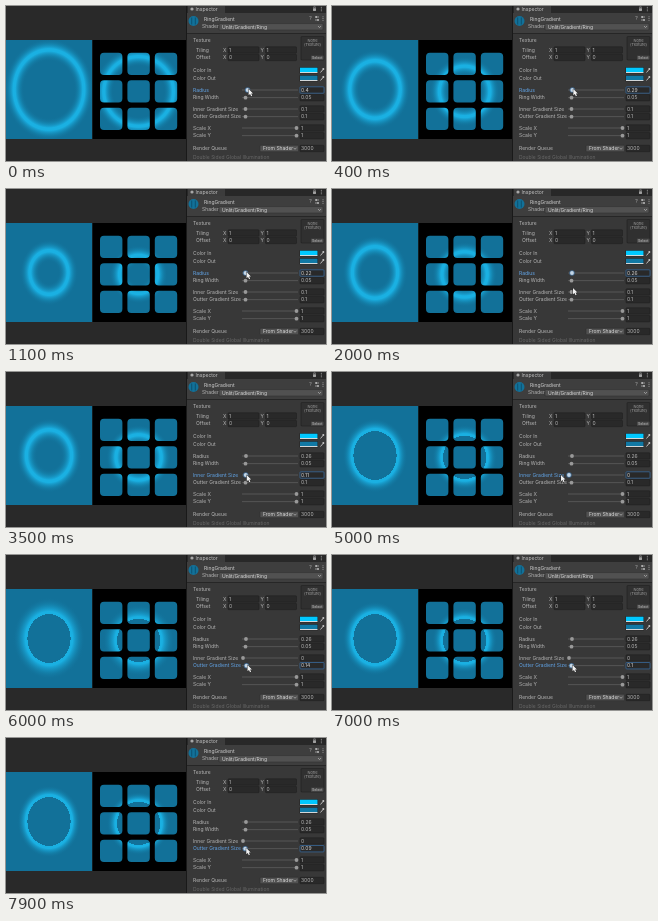
Animation of 320 by 155 pixels, one loop 8000 ms. Source, as an HTML page with a canvas:

```html
<!DOCTYPE html>
<html lang="en">
<head>
<meta charset="utf-8">
<title>Ring gradient inspector</title>
<style>
html, body { margin: 0; width: 100%; height: 100%; overflow: hidden; background: #383838; }
canvas { display: block; width: 100vw; height: 100vh; }
</style>
</head>
<body>
<canvas id="stage"></canvas>
<script>
const W = 320, H = 155, LOOP = 8000, STEP = 100;
const canvas = document.getElementById('stage');
const ctx = canvas.getContext('2d');
const FONT = 'Inter, Roboto, sans-serif';
const COLOR_IN = [26, 176, 226], COLOR_OUT = [18, 113, 153];
const PANEL = '#383838', BACKDROP = '#292929', FIELD = '#292929', TEXT = '#b8b8b8', ACTIVE = '#62a6ea';

// Keys are [time in ms, value], joined by straight lines.
const RADIUS = [[200, .4], [300, .34], [400, .29], [600, .27], [700, .27], [1100, .22], [1500, .27], [1700, .27], [1800, .26]];
const INNER = [[2500, .1], [3000, .15], [3400, .15], [3500, .11], [4000, .05], [4100, .05], [4600, 0]];
const OUTER = [[5500, .1], [6000, .14], [6400, .17], [6700, .16], [7200, .06], [7600, .1], [7700, .1], [7900, .09]];
const POINTER_Y = [[1800, 83], [2000, 99], [2400, 103], [5100, 103], [5400, 110]];
const POINTER_DX = [[4500, 1], [5000, -8], [5100, -8], [5400, 4], [5500, 1]];

function at(keys, t) {
  if (t <= keys[0][0]) return keys[0][1];
  for (let i = 1; i < keys.length; i++) {
    const [t0, a] = keys[i - 1], [t1, b] = keys[i];
    if (t <= t1) return a + (b - a) * (t - t0) / (t1 - t0);
  }
  return keys[keys.length - 1][1];
}

function rect(x, y, w, h, fill) {
  ctx.fillStyle = fill;
  ctx.fillRect(x, y, w, h);
}

function box(x, y, w, h, r, fill, stroke) {
  ctx.beginPath();
  ctx.roundRect(x, y, w, h, r);
  ctx.fillStyle = fill;
  ctx.fill();
  if (stroke) {
    ctx.strokeStyle = stroke;
    ctx.lineWidth = .6;
    ctx.stroke();
  }
}

function disc(x, y, r, fill) {
  ctx.beginPath();
  ctx.arc(x, y, r, 0, Math.PI * 2);
  ctx.fillStyle = fill;
  ctx.fill();
}

function line(points, color, width = .7) {
  ctx.beginPath();
  points.forEach(([x, y]) => ctx.lineTo(x, y));
  ctx.strokeStyle = color;
  ctx.lineWidth = width;
  ctx.stroke();
}

function dots(x, y) {
  for (let i = 0; i < 3; i++) disc(x, y + i * 1.8, .5, '#b0b0b0');
}

function label(str, x, y, color = TEXT, size = 5, align = 'left') {
  ctx.font = `${size}px ${FONT}`;
  ctx.textAlign = align;
  ctx.textBaseline = 'middle';
  ctx.fillStyle = color;
  ctx.fillText(str, x, y);
}

function field(str, x, y, w, active) {
  box(x, y - 3.2, w, 6.4, .8, FIELD, active ? '#3a79bb' : '#202020');
  label(str, x + 1, y + .2, active ? '#d4d4d4' : TEXT);
}

function mix(k) {
  return `rgb(${COLOR_OUT.map((c, i) => Math.round(c + (COLOR_IN[i] - c) * k))})`;
}

// Narrow crest with a quadratic falloff on either side.
function ringGradient(radius, width, inner, outer) {
  const g = ctx.createRadialGradient(0, 0, 0, 0, 0, 1);
  const near = radius - width / 4, far = radius + width / 4, n = 8;
  for (let i = 0; i <= n; i++) {
    const u = i / n;
    g.addColorStop(Math.max(0, near - inner * (1 - u)), mix(u * u));
  }
  for (let i = 0; i <= n; i++) {
    const u = i / n;
    g.addColorStop(far + outer * u, mix((1 - u) ** 2));
  }
  return g;
}

// Fills the current path with the ring laid over the given area.
function paintRing(cx, cy, w, h, ring) {
  ctx.save();
  ctx.clip();
  ctx.translate(cx, cy);
  ctx.scale(w, h);
  ctx.fillStyle = ring;
  ctx.fillRect(-.5, -.5, 1, 1);
  ctx.restore();
}

function drawScene(ring) {
  rect(0, 0, 181, H, BACKDROP);
  ctx.beginPath();
  ctx.rect(0, 34, 86.5, 99);
  paintRing(43, 83.5, 87, 99, ring);
  rect(86.5, 34, 93.5, 99, '#000');
  ctx.beginPath();
  for (let i = 0; i < 9; i++) {
    ctx.roundRect(94 + i % 3 * 27.4, 46.7 + Math.floor(i / 3) * 27.5, 22.4, 22.4, 4);
  }
  paintRing(132.6, 85.4, 87, 87, ring);
}

function dropdown(str, x, y, w) {
  box(x, y - 3.2, w, 6.4, .8, '#515151', '#303030');
  label(str, x + 3, y + .2, '#d8d8d8');
  line([[x + w - 5, y - .8], [x + w - 3.5, y + .8], [x + w - 2, y - .8]], TEXT);
}

function drawHeader() {
  rect(180, 0, 140, H, PANEL);
  rect(180, 0, 1, H, '#191919');
  rect(181, 0, 139, 7, '#282828');
  rect(182, 0, 37, 7, '#3c3c3c');
  disc(186, 3, 1.6, '#a8a8a8');
  label('Inspector', 189.5, 3.2, '#c8c8c8');
  box(307, 2.3, 3, 2.6, .4, '#a0a0a0');
  line([[307.7, 2.5], [307.7, .8], [309.3, .8], [309.3, 2.5]], '#a0a0a0', .6);
  dots(315.3, 1.2);

  rect(181, 7, 139, 20, '#3e3e3e');
  rect(181, 27, 139, .8, '#222');
  disc(187.5, 15, 5, mix(0));
  rect(185.2, 11.5, 1, 7, '#0d5170');
  rect(188.8, 11.5, 1, 7, '#0d5170');
  label('RingGradient', 198, 13.3, '#d0d0d0');
  label('?', 304.5, 12.5, TEXT, 5, 'center');
  line([[309, 11], [313, 11]], TEXT);
  line([[309, 14], [313, 14]], TEXT);
  disc(310.2, 11, .9, TEXT);
  disc(312, 14, .9, TEXT);
  dots(317, 10.7);
  label('Shader', 196, 20.8);
  dropdown('Unlit/Gradient/Ring', 213, 20.8, 104);
}

function swatch(name, y, color) {
  label(name, 187, y);
  rect(293.5, y - 3.2, 18.5, 6, '#202020');
  rect(294, y - 2.8, 17.5, 4.5, color);
  rect(294, y + 1.7, 17.5, .8, '#fff');
  line([[314.5, y + 2], [317, y - 1]], '#c8c8c8', .9);
  disc(317.3, y - 1.5, 1, '#c8c8c8');
}

function drawTexture() {
  label('Texture', 187, 34);
  [['Tiling', 1, 44], ['Offset', 0, 51.5]].forEach(([name, v, y]) => {
    label(name, 190, y);
    label('X', 217, y);
    field(v, 222, y, 31);
    label('Y', 254.5, y);
    field(v, 259.5, y, 31);
  });
  box(295, 30.5, 23, 23.5, .8, '#303030', '#202020');
  label('None', 306.5, 34.3, '#a0a0a0', 4, 'center');
  label('(Texture)', 306.5, 38.6, '#a0a0a0', 4, 'center');
  rect(305, 49.7, 12.5, 4, '#4a4a4a');
  label('Select', 311.2, 51.8, '#c0c0c0', 3.6, 'center');
}

function slider(name, value, y, knob, active) {
  label(name, 187, y, active ? ACTIVE : TEXT);
  rect(236, y - .4, 56, .8, '#5c5c5c');
  if (active) disc(knob, y, 2.7, 'rgba(70,130,190,.65)');
  disc(knob, y, 1.9, active ? '#c4d6e6' : '#999');
  field(String(+value.toFixed(2)), 294, y, 24, active);
}

function drawPointer(x, y) {
  ctx.beginPath();
  [[0, 0], [0, 6.2], [1.5, 4.9], [2.5, 7.2], [3.6, 6.7], [2.6, 4.5], [4.5, 4.4]]
    .forEach(([dx, dy]) => ctx.lineTo(x + dx, y + dy));
  ctx.closePath();
  ctx.lineWidth = .8;
  ctx.strokeStyle = '#222';
  ctx.stroke();
  ctx.fillStyle = '#f0f0f0';
  ctx.fill();
}

function draw(t) {
  const radius = at(RADIUS, t), inner = at(INNER, t), outer = at(OUTER, t);
  const active = t < 2500 ? 0 : t < 5500 ? 1 : 2;
  const knobs = [237 + radius * 11.5, 237 + inner * 25, 237 + outer * 25];

  drawScene(ringGradient(radius, .05, inner, outer));
  drawHeader();
  drawTexture();
  swatch('Color In', 64.5, '#00c8ff');
  swatch('Color Out', 72.5, '#1179a5');
  slider('Radius', radius, 84, knobs[0], active === 0);
  slider('Ring Width', .05, 91.7, 239.5);
  slider('Inner Gradient Size', inner, 103, knobs[1], active === 1);
  slider('Outter Gradient Size', outer, 110.7, knobs[2], active === 2);
  slider('Scale X', 1, 122, 290.5);
  slider('Scale Y', 1, 129.7, 290.5);
  label('Render Queue', 187, 142.5);
  dropdown('From Shader', 254, 142.5, 38.5);
  field('3000', 294, 142.5, 24);
  label('Double Sided Global Illumination', 187, 151, '#686868');
  drawPointer(knobs[active] + at(POINTER_DX, t), at(POINTER_Y, t));
}

function resize() {
  const dpr = window.devicePixelRatio || 1;
  canvas.width = Math.round(innerWidth * dpr);
  canvas.height = Math.round(innerHeight * dpr);
}

function frame() {
  const t = Math.floor(performance.now() % LOOP / STEP) * STEP;
  ctx.setTransform(canvas.width / W, 0, 0, canvas.height / H, 0, 0);
  draw(t);
  requestAnimationFrame(frame);
}

addEventListener('resize', resize);
resize();
frame();
</script>
</body>
</html>
```
